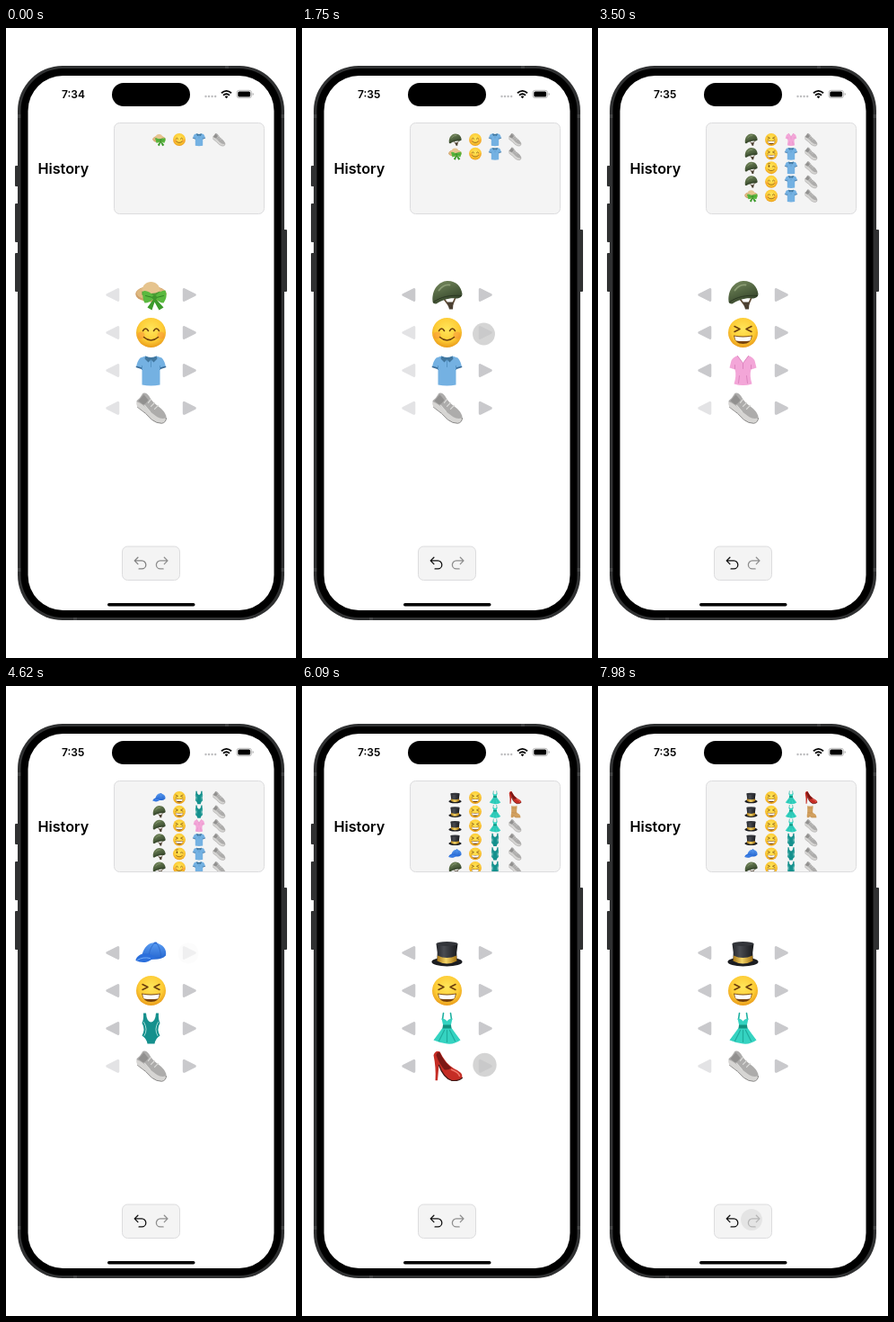
An HTML page for the animation above (8 s loop, 323x700 px).

```html
<!DOCTYPE html>
<html lang="en">
<head>
<meta charset="utf-8">
<title>Outfit history</title>
<style>
  html, body { margin: 0; width: 100%; height: 100%; overflow: hidden; background: #fff; }
  svg { display: block; width: 323px; height: 700px; }
  text { font-family: Inter, "Liberation Sans", sans-serif; fill: #000; }
  .line { fill: none; stroke-linecap: round; stroke-linejoin: round; }
  .card { fill: #f4f4f4; stroke: #dcdcde; }
</style>
</head>
<body>
<svg viewBox="0 0 323 700">
  <defs>
    <radialGradient id="gold" cx=".5" cy=".38" r=".63">
      <stop offset="0" stop-color="#ffe65a"/><stop offset=".65" stop-color="#fdcb35"/><stop offset="1" stop-color="#e99a1a"/>
    </radialGradient>
    <linearGradient id="olive" x1=".2" y1="0" x2=".7" y2="1">
      <stop offset="0" stop-color="#74875c"/><stop offset=".5" stop-color="#506340"/><stop offset="1" stop-color="#303e27"/>
    </linearGradient>
    <linearGradient id="felt">
      <stop offset="0" stop-color="#24262b"/><stop offset=".35" stop-color="#4a4c52"/><stop offset="1" stop-color="#17181b"/>
    </linearGradient>
    <linearGradient id="band">
      <stop offset="0" stop-color="#a87616"/><stop offset=".45" stop-color="#f5d566"/><stop offset="1" stop-color="#a06e10"/>
    </linearGradient>
    <linearGradient id="blue" x2="0" y2="1">
      <stop offset="0" stop-color="#5a9cf2"/><stop offset="1" stop-color="#2465cf"/>
    </linearGradient>
    <clipPath id="cardClip"><rect x="121" y="106" width="166" height="100" rx="6"/></clipPath>

    <g id="sunhat">
      <ellipse cy="-1" rx="17.2" ry="9" fill="#cfa06a"/>
      <ellipse cy="-2" rx="16" ry="7.4" fill="#dfb980"/>
      <path d="M-10-4C-10-18 10-18 10-4Q0 2-10-4" fill="#e6c48e"/>
      <path d="M-10-4Q0 1 10-4V0Q0 5-10 0Z" fill="#4b9a35"/>
      <path d="M4 3-4 14 1 17 4 8 9 17 14 14Z" fill="#3c9a2b"/>
      <path d="M4 2Q-4-6-9-4Q-10 4-7 9Q-1 9 4 3Q9 9 14 9Q19 2 16-5Q10-5 4 2" fill="#5ab93f"/>
      <path class="line" d="M-6 1 2 3M14 1 6 3" stroke="#328425"/>
      <circle cx="4" cy="3" r="2.6" fill="#3e972d"/>
    </g>
    <g id="helmet">
      <path class="line" d="M-3 5 3 13M9 4 5 13" stroke="#5d4a35" stroke-width="1.8"/>
      <path d="M0 8H7L6.5 16H2.5Z" fill="#4b4032"/>
      <path d="M-16 7C-17-6-9-15 0-15.5C10-16 16-9 17-1C17 2 14 4 10 4C3 3-6 6-12 10C-15 10-16 9-16 7" fill="url(#olive)"/>
      <path class="line" d="M-15 8C-7 2 4 0 16 1" stroke="#2a3722"/>
      <path class="line" d="M-9-5Q-4-12 3-11" stroke="#9dae85" stroke-width="1.8" opacity=".7"/>
    </g>
    <g id="cap">
      <path d="M-10 2C-7-8-1-12 5-11C13-10 18-4 16.5 3C13 7 6 8-2 7Z" fill="url(#blue)"/>
      <path d="M-9 1C-14 2-17 6-17 8.5C-13 10-8 12-2 9C1 7 3 6 6 6C2 2-4 0-9 1" fill="#2b6fdc"/>
      <path class="line" d="M4-11Q-1-6-2 1M6-11Q11-5 11 5" stroke="#2a64c2" stroke-width=".7"/>
      <path class="line" d="M-15 8Q-9 4-1 6" stroke="#73adf7"/>
      <ellipse cx="5" cy="-11" rx="2" ry="1" fill="#2c6bd3"/>
    </g>
    <g id="tophat">
      <ellipse cy="10" rx="17" ry="5" fill="#1c1d21"/>
      <path d="M-12-10Q-10 0-11 9Q0 15 11 9Q10 0 12-10Z" fill="url(#felt)"/>
      <path d="M-10.6 3Q0 8 10.6 3L11 9Q0 15-11 9Z" fill="url(#band)"/>
      <ellipse cy="-10" rx="12" ry="2.5" fill="#33353a"/>
    </g>
    <circle id="face" r="16.5" fill="url(#gold)"/>
    <g id="smile">
      <use href="#face"/>
      <circle cx="-11" cy="3" r="4" fill="#f5793b" opacity=".35"/><circle cx="11" cy="3" r="4" fill="#f5793b" opacity=".35"/>
      <path class="line" d="M-9-2Q-6-7-3-2M3-2Q6-7 9-2M-8 5Q0 12 8 5" stroke="#6b3d0d" stroke-width="1.5"/>
    </g>
    <g id="wink">
      <use href="#face"/>
      <ellipse cx="-6" cy="-4" rx="1.8" ry="2.8" fill="#6b3d0d"/>
      <path class="line" d="M3-3Q7-6 10-2M-8 5Q0 12 8 5M-9-10-4-11" stroke="#6b3d0d" stroke-width="1.5"/>
    </g>
    <g id="laugh">
      <use href="#face"/>
      <path class="line" d="M-9.5-7-3.5-4-9.5-1M9.5-7 3.5-4 9.5-1" stroke="#6b3d0d" stroke-width="1.5"/>
      <path d="M-10.5 3Q0 5 10.5 3Q9 12.5 0 12.5T-10.5 3" fill="#77430f"/>
      <path d="M-9.3 4Q0 6 9.3 4Q9 7.5 7.5 9Q0 10-7.5 9Q-9 7.5-9.3 4" fill="#fff"/>
    </g>
    <g id="polo">
      <path d="M-6-16-12-14Q-15-11-16.5-4L-10-2V16Q0 18 10 16V-2L16.5-4Q15-11 12-14L6-16Q0-13-6-16" fill="#74b1e2"/>
      <path class="line" d="M-16-4-10.5-2.4M16-4 10.5-2.4" stroke="#3a6c99" stroke-width="1.7"/>
      <path d="M-6-16Q0-13 6-16L7-13 3-9 0-12-3-9-7-13Z" fill="#41779f"/>
      <path class="line" d="M0-11V-4M-10-5V-1M10-5V-1" stroke="#5593c4"/>
    </g>
    <g id="blouse">
      <path d="M-6-16.5Q-11-15-13-11L-15-3-9-1Q-7 5-10 15Q0 18 10 15Q7 5 9-1L15-3 13-11Q11-15 6-16.5L0-8Z" fill="#f3a6d8"/>
      <path class="line" d="M-6-16 0-8 6-16M0-8V-2M-9-6V-2M9-6V-2M-4 6-5 14M4 6 5 14" stroke="#da80bc" stroke-width=".9"/>
    </g>
    <g id="swimsuit">
      <path d="M-8.5-17H-5.5Q-5-8 0-7Q5-8 5.5-17H8.5Q8-10 10-6Q6 1 10 8Q5 11 4 17H-4Q-5 11-10 8Q-6 1-10-6Q-8-10-8.5-17" fill="#15908d"/>
      <path class="line" d="M-8-7Q-3 1-7.5 8M8-7Q3 1 7.5 8" stroke="#a5dfd7"/>
    </g>
    <g id="dress">
      <path class="line" d="M-5-10-4-17M5-10 4-17" stroke="#1caf9f" stroke-width="1.6"/>
      <path d="M-6-11Q-2-11 0-8Q2-11 6-11L4-2Q9 5 15 13Q8 18 0 17T-15 13Q-9 5-4-2Z" fill="#35d3c1"/>
      <path d="M-4.5-4H4.5L5 0H-5Z" fill="#14917f"/>
      <path class="line" d="M-3 2-9 14M0 2V15M3 2 9 14" stroke="#1fac9d" stroke-width="1.2"/>
    </g>
    <g id="sneaker">
      <path d="M-16-8Q-12-11-9-16.5Q-5-18-2-13Q1-7 8-2Q15 3 17 9Q17 14 12 16Q5 14-1 8L-15-2Z" fill="#adacab"/>
      <path d="M-16-7Q-17-3-14-1Q-5 6 1 13Q6 17 12 17Q17 16 17 11Q12 13 7 10Q0 5-4 1Q-10-5-16-7" fill="#d6d5d3"/>
      <path class="line" d="M-15-1Q-5 6 1 13Q6 17 12 17Q17 16 17 11" stroke="#8b8a89"/>
      <path d="M-14-8-8-15-3-9Q-6-4-9-4Z" fill="#91908f"/>
      <path class="line" d="M-3-6 0-10M0-2 4-6M4 1 8-3M-7-3-1 4" stroke="#dededc" stroke-width="1.1"/>
    </g>
    <g id="boot">
      <path d="M-9-16Q-2-13 6-16L5 3Q15 8 15 13L14 16H2L-3 12-4 16H-10Q-11 9-9 3Z" fill="#d2a05f"/>
      <path class="line" d="M-8-10Q-1-8 5-10M-8 2Q0 5 5 3M-9 11H-4L2 15H15" stroke="#b5844a"/>
    </g>
    <g id="heel">
      <path d="M-15-12Q-13-18-8-16Q-2-3 8 3Q18 7 17 13Q13 17 5 16Q-4 13-9-1L-10.5 16H-13Q-12 2-15-12" fill="#c52d25"/>
      <path d="M-12-12Q-11-16-8-15Q-3-4 5 2Q1 5-3 4Q-9-3-12-12" fill="#7c1815"/>
      <path class="line" d="M5 4Q13 7 14 11" stroke="#f0786a" stroke-width="1.6"/>
      <path class="line" d="M-9-1Q-4 13 5 16Q13 17 17 13" stroke="#3b1715" stroke-width="1.2"/>
    </g>
    <path id="arrow" d="M-6 0 6-6V6Z" fill="#c9c9cc" stroke="#c9c9cc" stroke-width="3" stroke-linejoin="round"/>
    <path id="turn" class="line" d="M-2.6-7-6.3-3.3-2.6.4M-6-3.3H1.8A4.5 4.5 0 0 1 1.8 5.7H-1.4" stroke="#111" stroke-width="1.3"/>
  </defs>

  <g fill="#303132">
    <rect x="10" y="153" width="5" height="23" rx="1"/><rect x="10" y="195" width="5" height="43" rx="1"/>
    <rect x="10" y="250" width="5" height="43" rx="1"/><rect x="308" y="224" width="5" height="69" rx="1"/>
  </g>
  <rect x="13" y="42" width="297" height="616" rx="50" fill="#303132"/>
  <path d="M13 96h4v4h-4zM306 96h4v4h-4zM13 600h4v4h-4zM306 600h4v4h-4zM244 42h4v4h-4zM75 654h4v4h-4z" fill="#434445"/>
  <rect x="16.5" y="45" width="290" height="610" rx="47"/>
  <rect x="24.5" y="53" width="274" height="594" rx="39" fill="#fff"/>
  <rect x="118" y="61" width="87" height="26" rx="13"/>
  <text id="clock" x="62" y="77.6" font-size="12" font-weight="600">7:34</text>
  <g fill="#bdbdbf">
    <circle cx="222.5" cy="76" r="1.2"/><circle cx="226" cy="76" r="1.2"/><circle cx="229.6" cy="76" r="1.2"/><circle cx="233.2" cy="76" r="1.2"/>
  </g>
  <g class="line" stroke="#000" stroke-width="1.8" style="stroke-linecap:butt">
    <path d="M240 72.3Q245.5 67.5 251 72.3M242 74.7Q245.5 71.7 249 74.7"/>
  </g>
  <path d="M243.6 76.2Q245.5 74.7 247.4 76.2L245.5 78.2Z"/>
  <rect x="257" y="69.3" width="16.5" height="8.4" rx="2.6" fill="none" stroke="#aaa" stroke-width=".8"/>
  <rect x="258.3" y="70.6" width="13.9" height="5.8" rx="1.5"/>
  <path d="M274.6 72v3q1.2-.4 1.2-1.5t-1.2-1.5" fill="#aaa"/>
  <text x="35.4" y="161.8" font-size="16.2" font-weight="600">History</text>
  <rect class="card" x="120.5" y="105.5" width="167" height="101" rx="6"/>
  <g clip-path="url(#cardClip)"><g id="history"></g></g>
  <g id="picker"></g>
  <rect class="card" x="129.5" y="576" width="64" height="37.5" rx="6"/>
  <use id="undo" href="#turn" transform="translate(149.5 595.2)"/>
  <use id="redo" href="#turn" transform="translate(173.7 595.2) scale(-1 1)"/>
  <rect x="113" y="639" width="97.5" height="3.4" rx="1.7"/>
  <circle id="touch" fill="#000" opacity="0"/>
</svg>
<script>
const LOOP = 8000, ROW_STEP = 15.6, UNDO = 4, REDO = 5;
const items = [
  ["sunhat", "helmet", "cap", "tophat"],
  ["smile", "wink", "laugh"],
  ["polo", "blouse", "swimsuit", "dress"],
  ["sneaker", "boot", "heel"]
];
const rowY = [296.5, 338.5, 380.5, 422.3];
const columnX = [170.5, 193, 215, 237];
const touchAt = [[203, 297], [202.5, 340], [203, 381], [203.5, 421], [151.5, 598], [171, 593]];

// press time, release time, control
const taps = [
  [1000, 1180, 0], [1640, 1830, 1], [2200, 2380, 1], [2850, 3030, 2], [3620, 3800, 2],
  [4230, 4400, 0], [4600, 4780, 0], [5100, 5250, 2], [5500, 5640, 3], [5900, 6060, 3],
  [6650, 6960, UNDO], [7180, 7380, UNDO], [7930, 8100, REDO]
];

const byId = id => document.getElementById(id);
function add(parent, name, attrs) {
  const node = document.createElementNS("http://www.w3.org/2000/svg", name);
  for (const key in attrs) node.setAttribute(key, attrs[key]);
  return parent.appendChild(node);
}
const ramp = (t, from, to) => Math.min(1, Math.max(0, (t - from) / (to - from)));

const outfits = [[0, 0, 0, 0]];
for (const [, , control] of taps) {
  if (control >= UNDO) continue;
  const next = outfits[outfits.length - 1].slice();
  next[control]++;
  outfits.push(next);
}

const historyRows = outfits.map(outfit => {
  const row = add(byId("history"), "g", {});
  outfit.forEach((choice, slot) => add(row, "use", {
    href: "#" + items[slot][choice], transform: `translate(${columnX[slot]} 0) scale(.42)`
  }));
  return row;
});

const picker = rowY.map(y => ({
  left: add(byId("picker"), "use", { href: "#arrow", transform: `translate(118.8 ${y})` }),
  item: add(byId("picker"), "use", { transform: `translate(161.5 ${y})` }),
  right: add(byId("picker"), "use", { href: "#arrow", transform: `translate(204.3 ${y}) scale(-1 1)` })
}));

function render(t) {
  let current = 0, newest = 0, touch = 0, radius = 0, position = touchAt[0];
  const shade = Array(6).fill(1);
  for (const [press, release, control] of taps) {
    if (t >= release) {
      if (control === UNDO) current--;
      else newest = ++current;
    }
    if (t < press) continue;
    const recovered = ramp(t, release + 60, release + 260);
    shade[control] = Math.min(shade[control], .22 + .78 * recovered);
    const strength = ramp(t, press + 15, press + 115) * (1 - ramp(t, release + 60, release + 180));
    if (strength > touch) {
      touch = strength;
      radius = 11.5 + 2.2 * ramp(t, press, press + 250);
      position = touchAt[control];
    }
  }

  byId("clock").textContent = t < 420 ? "7:34" : "7:35";
  historyRows.forEach((row, i) => {
    row.setAttribute("transform", `translate(0 ${124 + (newest - i) * ROW_STEP})`);
    row.style.display = i <= newest ? "" : "none";
  });
  picker.forEach(({ left, item, right }, slot) => {
    const choice = outfits[current][slot];
    item.setAttribute("href", "#" + items[slot][choice]);
    left.setAttribute("opacity", choice ? 1 : .5);
    right.setAttribute("opacity", shade[slot]);
  });
  // Redo becomes available just before the outfit itself is restored.
  const canRedo = t >= 6900;
  byId("undo").setAttribute("opacity", current ? shade[UNDO] : .5);
  byId("redo").setAttribute("opacity", canRedo ? shade[REDO] : .45);
  byId("touch").setAttribute("cx", position[0]);
  byId("touch").setAttribute("cy", position[1]);
  byId("touch").setAttribute("r", radius);
  byId("touch").setAttribute("opacity", .17 * touch);
}

const start = performance.now();
function tick() {
  render((performance.now() - start) % LOOP);
  requestAnimationFrame(tick);
}
tick();
</script>
</body>
</html>
```
